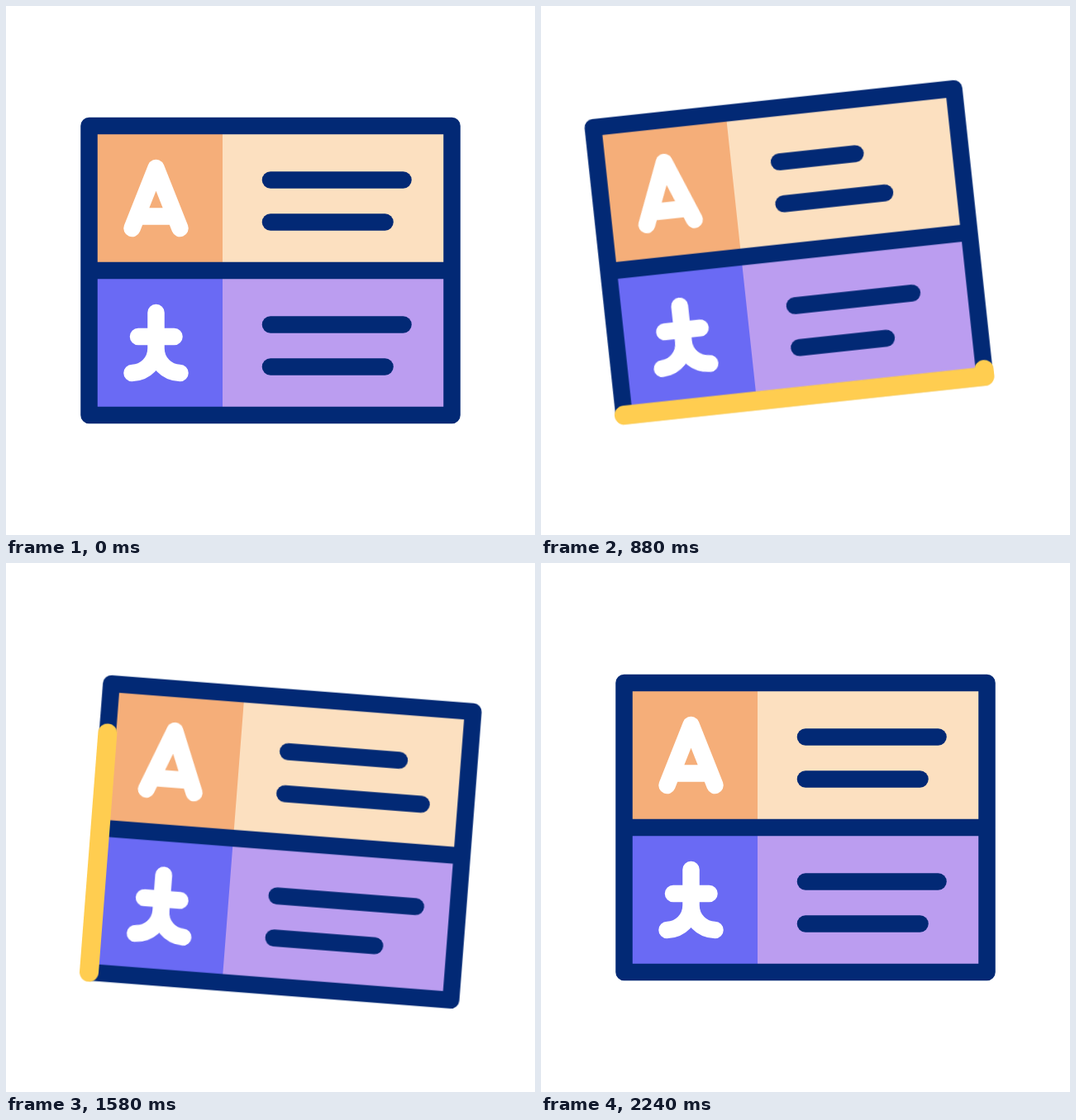
Recreate the animation shown at these times as an HTML page. Size 640 px wide and 640 px high, loop 2.4 s.

```html
<!DOCTYPE html>
<html lang="en">
<head>
<meta charset="utf-8">
<title>Translation card</title>
<style>
  @property --head { syntax: "<number>"; inherits: false; initial-value: 0; }
  @property --tail { syntax: "<number>"; inherits: false; initial-value: 0; }

  html, body { margin: 0; width: 100%; height: 100%; overflow: hidden; background: #fff; }
  svg { display: block; width: 100%; height: 100%; }

  .stroke { fill: none; stroke-width: 20.5; stroke-linecap: round; stroke-linejoin: round; }
  .navy { stroke: #022975; }
  .white { stroke: #fff; }

  .card, .line, .trail {
    animation: 2400ms cubic-bezier(.3333, 0, .6667, 1) infinite;
  }
  .card { transform-origin: 100.5px 495px; animation-name: swing; }
  .l1 { animation-name: l1; }
  .l2 { animation-name: l2; }
  .l3 { animation-name: l3; }
  .l4 { animation-name: l4; }

  /* The border trail is the stretch of outline between tail and head. */
  .trail {
    stroke: #ffcd50;
    stroke-width: 23;
    stroke-dasharray: calc((var(--head) - var(--tail)) * 1px) 4000px;
    stroke-dashoffset: calc(var(--tail) * -1px);
    animation-name: head, tail, show;
    animation-timing-function: cubic-bezier(.3333, 0, .6667, 1), cubic-bezier(.3333, 0, .6667, 1), step-end;
  }

  @keyframes swing {
    0%, 8.333% { transform: rotate(0deg); }
    33.333% { transform: rotate(-7deg); }
    58.333% { transform: rotate(10deg); }
    75% { transform: rotate(-3deg); }
    91.667%, 100% { transform: rotate(0deg); }
  }
  @keyframes head {
    0%, 25% { --head: 0; }
    58.333%, 100% { --head: 1578; }
  }
  @keyframes tail {
    0%, 41.667% { --tail: 0; }
    75%, 100% { --tail: 1578; }
  }
  @keyframes show {
    0% { opacity: 0; }
    25.1% { opacity: 1; }
    74.9%, 100% { opacity: 0; }
  }
  @keyframes l1 {
    0%, 16.667% { stroke-dasharray: 160.5px 999px; }
    46.667% { stroke-dasharray: 69px 999px; }
    73.75% { stroke-dasharray: 152px 999px; }
    93.333%, 100% { stroke-dasharray: 160.5px 999px; }
  }
  @keyframes l2 {
    0%, 8.333% { stroke-dasharray: 138.5px 999px; }
    36.667% { stroke-dasharray: 123px 999px; }
    60.417% { stroke-dasharray: 168px 999px; }
    91.667%, 100% { stroke-dasharray: 138.5px 999px; }
  }
  @keyframes l3 {
    0%, 8.333% { stroke-dasharray: 160.5px 999px; }
    33.333% { stroke-dasharray: 140px 999px; }
    54.167% { stroke-dasharray: 178.4px 999px; }
    75.833%, 100% { stroke-dasharray: 160.5px 999px; }
  }
  @keyframes l4 {
    0%, 8.333% { stroke-dasharray: 138.5px 999px; }
    25% { stroke-dasharray: 101.3px 999px; }
    62.5% { stroke-dasharray: 121.6px 999px; }
    85%, 100% { stroke-dasharray: 138.5px 999px; }
  }
</style>
</head>
<body>
<svg viewBox="0 0 640 640">
  <g class="card">
    <path fill="#fce0c0" d="M100.5 145H539.5V320H100.5z"/>
    <path fill="#bb9df0" d="M100.5 320H539.5V495H100.5z"/>
    <path fill="#f5ae79" d="M100.5 145H262V320H100.5z"/>
    <path fill="#6a6af4" d="M100.5 320H262V495H100.5z"/>

    <path class="stroke white" d="M152.5 269L181.5 196L210.5 269M163 254.5H200"/>
    <path class="stroke white" d="M181.5 371V414A29 30 0 0 1 152.5 444M181.5 414A29 30 0 0 0 210.5 444M160 400H203.5"/>

    <path class="stroke navy line l1" d="M320 210.5h220"/>
    <path class="stroke navy line l2" d="M320 261.5h220"/>
    <path class="stroke navy line l3" d="M320 385.5h220"/>
    <path class="stroke navy line l4" d="M320 436.5h220"/>

    <path class="stroke navy" d="M100.5 145H539.5V495H100.5zM100.5 320H539.5"/>
    <path class="stroke trail" d="M100.5 495H539.5V145H100.5V495"/>
  </g>
</svg>
</body>
</html>
```
